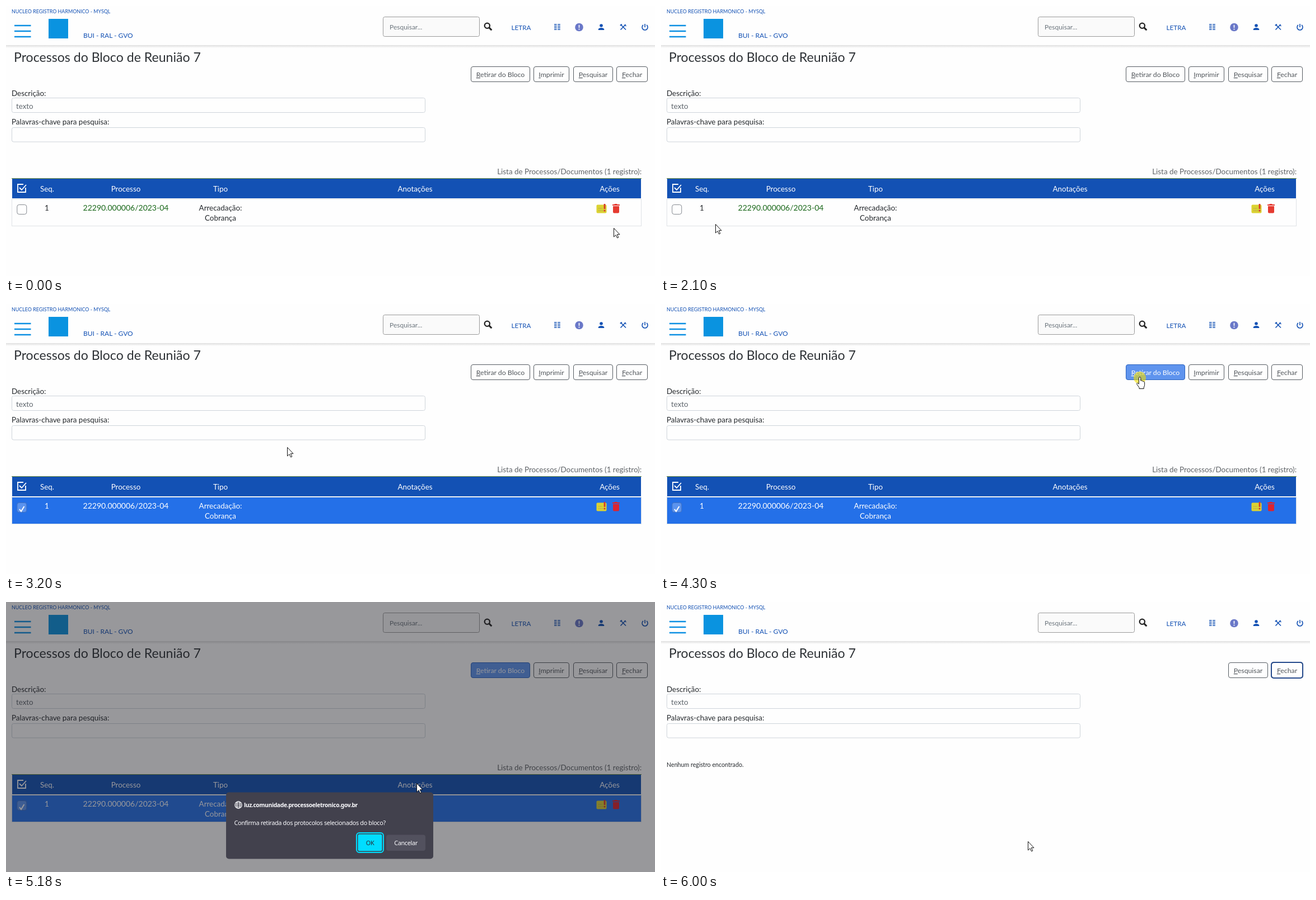
Animation, 1159 px wide and 483 px high, one loop 6860 ms. Source, as an HTML page:

```html
<!DOCTYPE html>
<html lang="pt-BR">
<head>
<meta charset="utf-8">
<title>Bloco de Reunião</title>
<style>
html, body { margin: 0; width: 100%; height: 100%; overflow: hidden; background: #fefefe; }
svg { display: block; width: 1159px; height: 483px; font: 13.4px Lato, sans-serif; }
text { white-space: pre; }
.mid { text-anchor: middle; }
.ui { font-family: "Noto Sans", sans-serif; font-size: 10.9px; letter-spacing: -.36px; fill: #fbfbfe; }
.blue { fill: #1351b4; }
.line { fill: none; stroke: #1351b4; stroke-width: 1.6; }
.field { fill: #fefefe; stroke: #ced4da; }
.button rect { fill: #fefefe; stroke: #555b61; }
.button text { font-size: 12.3px; fill: #50555a; text-anchor: middle; }
.button tspan { text-decoration: underline; }
</style>
</head>
<body>
<svg viewBox="0 0 1159 483">
  <defs>
    <linearGradient id="shade" x2="0" y2="1">
      <stop stop-color="#dedede"/><stop offset="1" stop-color="#fefefe"/>
    </linearGradient>
  </defs>
  <rect width="1159" height="483" fill="#fefefe"/>

  <!-- page header -->
  <rect y="70" width="1159" height="5" fill="url(#shade)"/>
  <text class="blue" x="10" y="12.5" font-size="8.9">NUCLEO REGISTRO HARMONICO - MYSQL</text>
  <path d="M15 35H44.5M15 45H44.5M15 55H44.5" stroke="#0a8fe2" stroke-width="2.6"/>
  <rect x="76" y="23" width="35" height="35" fill="#0a93e0"/>
  <text class="blue" x="138" y="57" font-size="12">BUI - RAL - GVO</text>
  <rect x="673.5" y="19.5" width="172" height="35" rx="3" fill="#fafafa" stroke="#999"/>
  <text x="685" y="42" font-size="12" fill="#6c757d">Pesquisar...</text>
  <circle cx="859.3" cy="35.2" r="4.6" fill="none" stroke="#222" stroke-width="2.3"/>
  <path d="M862.7 38.6L867.3 43.2" stroke="#222" stroke-width="3"/>
  <text class="blue mid" x="920" y="42.5" font-size="11.7">LETRA</text>
  <path class="line" stroke-dasharray="4.6 1.6" d="M979 33H989.8M979 36H989.8M979 39H989.8M979 42H989.8"/>
  <circle cx="1023.5" cy="38" r="7.3" fill="#6a78c8"/>
  <path d="M1023.5 33.8V39M1023.5 40.6V42.4" stroke="#fff" stroke-width="1.7"/>
  <circle class="blue" cx="1063" cy="35" r="2.8"/>
  <path class="blue" d="M1057.8 43V41.5Q1058.5 39 1063 39T1068.2 41.5V43Z"/>
  <path class="line" d="M1097.5 33L1107 42.5M1106.5 33L1097.5 42.5M1096.8 35L1100 32.6M1104.5 33.5L1107.5 36"/>
  <path class="line" d="M1138 34A5 5 0 1 0 1144 34M1141 32V38"/>

  <!-- form -->
  <text x="14" y="100" font-size="23.1" fill="#2e3236">Processos do Bloco de Reunião 7</text>
  <g id="buttons"></g>
  <rect id="focus" x="1090" y="108" width="56" height="28" rx="4" fill="none" stroke="#254a8c" stroke-width="2"/>
  <g fill="#24282c">
    <text x="10" y="160.5">Descrição:</text>
    <text x="10" y="211.5">Palavras-chave para pesquisa:</text>
  </g>
  <rect class="field" x="10.5" y="164.5" width="738" height="26" rx="3"/>
  <rect class="field" x="10.5" y="217.5" width="738" height="25.5" rx="3"/>
  <text x="18" y="183.5" font-size="13.3" fill="#5f666d">texto</text>

  <!-- list -->
  <g id="list">
    <text x="1135" y="301" text-anchor="end" fill="#5f6367">Lista de Processos/Documentos (1 registro):</text>
    <rect x="10" y="308" width="1125" height="1" fill="#6d8c3c"/>
    <rect x="11" y="309" width="1123" height="35" fill="#1351b4"/>
    <path d="M35 325V333H21V319H31M24 325L28 329L36 320" fill="none" stroke="#fff" stroke-width="1.8"/>
    <g class="mid" fill="#fff">
      <text x="73.5" y="332">Seq.</text><text x="214" y="332">Processo</text>
      <text x="383" y="332">Tipo</text><text x="730.5" y="332">Anotações</text>
      <text x="1078" y="332">Ações</text>
    </g>
    <rect id="row" x="10.5" y="345.5" width="1124" height="48" stroke="#dfe3e6"/>
    <rect id="box" x="19.8" y="355.5" width="17" height="17" rx="3.5"/>
    <path id="tick" d="M24 367L27 371L32.5 362" fill="none" stroke="#fff" stroke-width="2"/>
    <g id="cells" class="mid">
      <text x="73" y="366">1</text>
      <text x="383" y="366">Arrecadação:</text><text x="383" y="384">Cobrança</text>
    </g>
    <text id="number" class="mid" x="214" y="366" font-size="14">22290.000006/2023-04</text>
    <rect x="1054.5" y="355.5" width="18" height="15" rx="2" fill="#dbd232"/>
    <path d="M1058 362H1065M1058 366H1070" stroke="#a89a58" stroke-dasharray="2 1"/>
    <path d="M1069 354V363M1069 364.8V367.5" stroke="#d93a2b" stroke-width="2.8"/>
    <path id="trash" d="M1083 355H1086L1087 354H1091L1092 355H1096V357H1083ZM1084 358H1095V368.5Q1095 370.5 1093 370.5H1086Q1084 370.5 1084 368.5Z"/>
  </g>
  <text id="empty" x="10" y="295" font-size="10.7" fill="#24282c">Nenhum registro encontrado.</text>

  <g id="tip">
    <rect x="1091.5" y="384" width="80" height="18.5" rx="2" fill="#2b2a33"/>
    <text class="ui" x="1094.5" y="397.5" style="font-size:10.5px">Retirar Processo/Documento do Bloco</text>
  </g>

  <!-- confirmation -->
  <g id="dialog">
    <rect width="1159" height="483" fill="#1c1b22" fill-opacity=".45"/>
    <rect x="393" y="340.5" width="370" height="119" rx="5" fill="#42414d"/>
    <g fill="none" stroke="#fbfbfe" stroke-width="1.1">
      <circle cx="415" cy="363" r="6.2"/><ellipse cx="415" cy="363" rx="2.8" ry="6.2"/>
      <path d="M409 363H421M410 359.7H420M410 366.3H420"/>
    </g>
    <text class="ui" x="425" y="367" style="font-size:10.3px" font-weight="600">luz.comunidade.processoeletronico.gov.br</text>
    <text class="ui" x="407.5" y="398.5">Confirma retirada dos protocolos selecionados do bloco?</text>
    <rect x="626" y="413" width="48" height="35" rx="5" fill="none" stroke="#00ddff" stroke-width="2"/>
    <rect id="ok" x="628.5" y="415.5" width="43" height="30" rx="3"/>
    <text class="ui mid" x="650" y="435" style="fill:#2b2a33">OK</text>
    <rect x="679" y="416.5" width="70" height="28.5" rx="4" fill="#52515e"/>
    <text class="ui mid" x="714" y="435">Cancelar</text>
  </g>

  <g id="pointer" fill="#fff" stroke="#111" stroke-linejoin="round">
    <circle id="click" r="11" cy="1" fill="#f0dc00" fill-opacity=".6" stroke="none"/>
    <path id="arrow" d="M-.5-.5V15L3 11.7L5.6 17L7.8 16L5.3 10.7H10Z"/>
    <path id="hand" d="M-1.7 1.3Q-1.7-.3 0-.3T1.7 1.3V6Q3.5 5.2 4.3 6.9Q6 6.3 6.7 7.9Q8.6 7.6 8.6 9.6V13.5Q8.6 16 7.2 18V20.5H-1V18.5L-5 12.8Q-6 11-4.5 10.4Q-3.3 10-1.7 12.2Z"/>
  </g>
</svg>
<script>
const LOOP = 6860;
const $ = id => document.getElementById(id);
const show = (id, on) => $(id).style.display = on ? '' : 'none';
const paint = (id, fill, stroke) => {
  $(id).style.fill = fill;
  if (stroke) $(id).style.stroke = stroke;
};

$('buttons').innerHTML = [
  ['remove', 830, 106, 'Retirar do Bloco'], ['print', 942, 64, 'Imprimir'],
  ['search', 1013, 71, 'Pesquisar'], ['close', 1090, 56, 'Fechar']
].map(([id, x, w, label]) => `<g id="${id}" class="button">
  <rect id="${id}Box" x="${x + .5}" y="108.5" width="${w - 1}" height="27" rx="3.5"/>
  <text id="${id}Label" x="${x + w / 2}" y="127"><tspan>${label[0]}</tspan>${label.slice(1)}</text></g>`).join('');

// start, end, number of steps, then waypoints as [progress, x, y]
const moves = [
  [0, 0, 1, [0, 1086, 398]],
  [330, 750, 7, [0, 1088, 394], [.7, 1092, 368], [1, 1092, 365]],
  [1350, 2030, 11, [0, 1070, 380], [.2, 930, 401], [.6, 520, 408], [1, 122, 402]],
  [2100, 2510, 7, [0, 98, 391], [.6, 40, 372], [1, 23, 366]],
  [2650, 3270, 10, [0, 23, 366], [.11, 28, 364], [.33, 118, 340], [.44, 218, 315], [.89, 504, 257], [1, 583, 227]],
  [3340, 3960, 10, [0, 650, 210], [.35, 800, 165], [.7, 848, 138], [1, 855, 131]],
  [4760, 5390, 10, [0, 852, 140], [.55, 755, 300], [.77, 715, 348], [1, 666, 402]],
  [5460, 5600, 3, [0, 660, 415], [1, 656, 429]]
];

function pointerAt(t) {
  const [start, end, count, ...points] = moves.filter(m => m[0] <= t).pop();
  const last = count - 1;
  if (!last || t >= end) return points[points.length - 1].slice(1);
  const u = Math.floor((t - start) / (end - start) * last + .1) / last;
  const i = Math.max(1, points.findIndex(p => p[0] >= u));
  const [a, b] = [points[i - 1], points[i]];
  const k = (u - a[0]) / (b[0] - a[0]);
  return [1, 2].map(n => Math.round(a[n] + (b[n] - a[n]) * k));
}

function render(t) {
  const [x, y] = pointerAt(t);
  const selected = t >= 2650, dialog = t >= 4430 && t < 6000, done = t >= 6000;
  const onRow = !selected && y > 345 && y < 391;
  const onTrash = onRow && x > 1083 && x < 1097 && y < 371;
  const onRemove = t < 4430 && x > 829 && x < 936 && y < 136;
  const removeLit = onRemove || dialog;

  paint('row', selected ? '#2470e8' : onRow ? '#e3e3e3' : '#fefefe');
  paint('box', selected ? '#5b93ee' : '#fefefe', selected ? '#3f6fc0' : '#858a90');
  show('tick', selected);
  paint('cells', selected ? '#fff' : '#24282c');
  paint('number', selected ? '#fff' : '#176617');
  paint('trash', selected ? '#dc2430' : '#e53a30');
  $('trash').style.opacity = onTrash ? .4 : 1;
  show('tip', t >= 950 && t < 1350);

  paint('removeBox', !removeLit ? '#fefefe' : t < 4030 ? '#8db3f2' : '#5f94ee', removeLit ? '#2a62bd' : '#555b61');
  paint('removeLabel', removeLit ? '#fff' : '#50555a');

  for (const id of ['list', 'remove', 'print']) show(id, !done);
  for (const id of ['empty', 'focus']) show(id, done);
  show('dialog', dialog);
  paint('ok', t >= 5870 ? '#aaf2ff' : t >= 5460 ? '#80ebff' : '#00ddff');

  const pointing = onTrash || onRemove;
  $('pointer').setAttribute('transform', `translate(${x} ${y})`);
  show('hand', pointing);
  show('arrow', !pointing);
  show('click', [[2650, 2720], [4300, 4430], [5870, 6000]].some(([a, b]) => t >= a && t < b));
}

const began = performance.now();
function tick() {
  render((performance.now() - began) % LOOP);
  requestAnimationFrame(tick);
}
tick();
</script>
</body>
</html>
```
